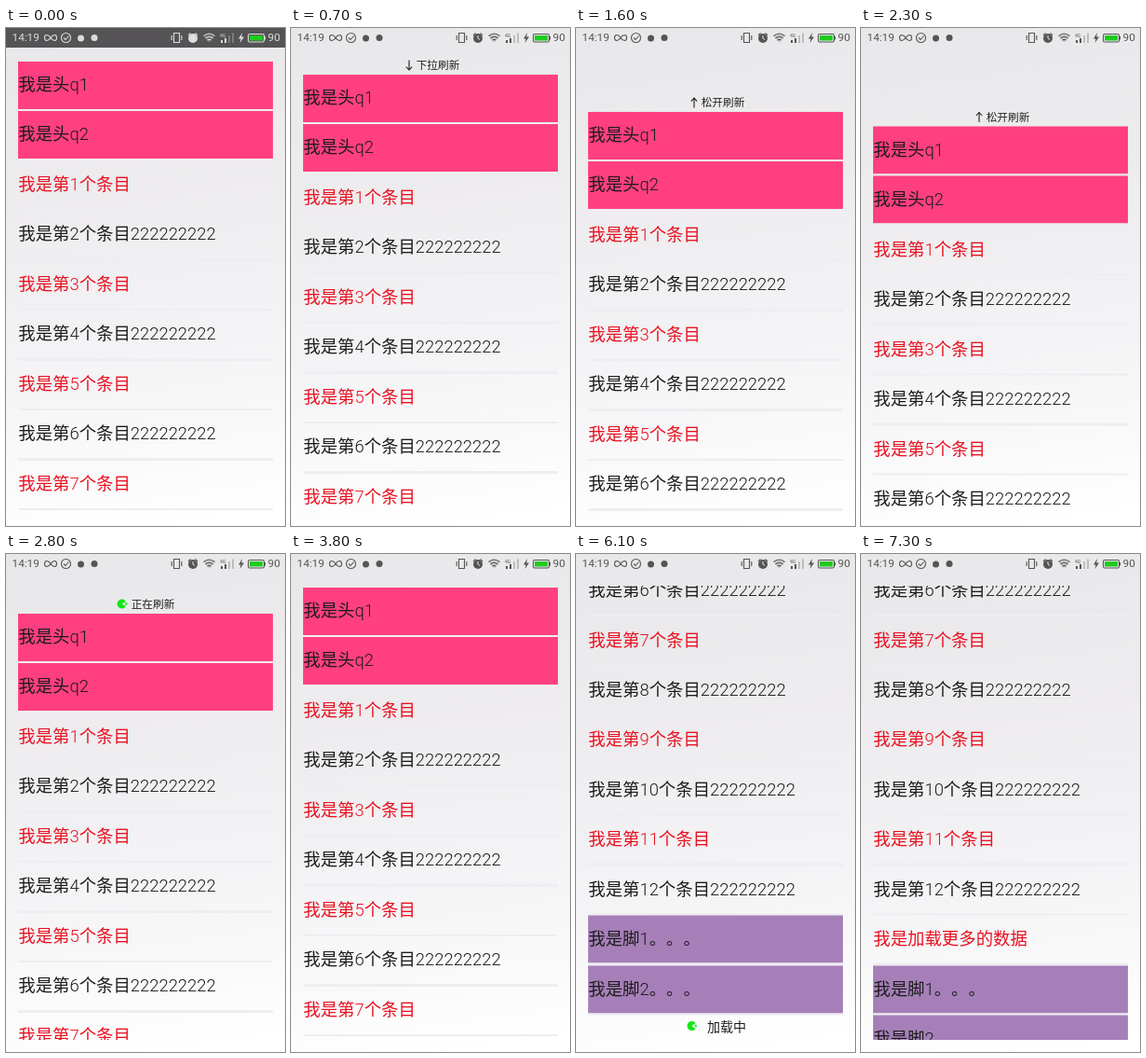
These frames come from a looping animation (300 by 534 pixels, 8000 ms). An HTML page:

```html
<!DOCTYPE html>
<html lang="zh">
<head>
<meta charset="utf-8">
<title>Pull to refresh list</title>
<style>
html, body { margin: 0; width: 100%; height: 100%; overflow: hidden; }
body {
  position: relative;
  background: linear-gradient(172deg, #e8e7e9, #eeecee 35%, #f4f3f5 65%, #fff 97%);
  font: 300 18.4px Roboto, "Noto Sans CJK SC", "Noto Sans CJK", sans-serif;
  text-spacing-trim: space-all;
  color: #1c1c1c;
  white-space: nowrap;
}
#shade { position: absolute; inset: 0 0 auto; height: 20.5px; background: #555355; }
#bar { position: absolute; left: 0; top: 0; }
#bar text { font-size: 11.8px; font-weight: 400; fill: currentColor; }
#view { position: absolute; left: 13px; top: 34px; width: 274px; height: 487px; overflow: hidden; }
#list { position: absolute; left: 0; top: 2px; width: 100%; }
.row { position: relative; height: 51px; line-height: 50px; margin-bottom: 2.44px; padding-left: .3px; }
.row::after { content: ""; position: absolute; left: 0; right: 0; top: 51px; height: 2.44px; background: #eeedf1; }
.head { background: #ff3f80; }
.foot { background: #a67fb8; }
.red { color: #e9101f; }
#top { position: absolute; left: 0; top: -17px; height: 14px; line-height: 14px; font-size: 11.67px; color: #222; }
#top span { position: absolute; left: 121.7px; }
#arrow { position: absolute; left: 109.5px; top: 1px; }
#more { position: relative; height: 26px; line-height: 24px; font-size: 14px; }
#more span { position: absolute; left: 128px; }
.pac { position: absolute; left: 103px; overflow: visible; fill: #14e514; }
#top .pac { top: -2px; }
#more .pac { top: 3px; }
</style>
</head>
<body>
<div id="shade"></div>
<svg id="bar" width="300" height="21" fill="none" stroke="currentColor" stroke-width="1.1">
  <g stroke="none">
    <text x="6.5" y="14.4">14:19</text>
    <text x="281.5" y="14.4">90</text>
    <text x="230" y="9.5" style="font-size:5px">4G</text>
  </g>
  <path d="M48 10.5C45 6 41.5 7 41.5 10.5S45 15 48 10.5S54.500 7 54.500 10.5S51 15 48 10.5Z"/>
  <circle cx="64.500" cy="10.500" r="5"/>
  <path d="M62 10.500l2 2l3.500-4"/>
  <g fill="currentColor" stroke="none">
    <circle cx="80.500" cy="11" r="3.500"/>
    <circle cx="95" cy="10.500" r="3.500"/>
    <circle cx="201" cy="11" r="5"/>
    <path d="M212.500 8.500Q218.500 3.500 224.500 8.500L218.500 16Z" opacity=".2"/>
    <path d="M231 16v-3h2v3zM235 16v-5h2v5z"/>
    <path d="M239 16v-8h2v8zM243 16v-10.500h2v10.500z" opacity=".3"/>
    <path d="M254 5l-4 6.500h2.500l-1 4.500l4.500-6.500h-2.800z"/>
  </g>
  <path d="M180.500 5.500h6v10h-6zM178.200 8v5M188.800 8v5"/>
  <path d="M196 8l2.500-2.500M206 8l-2.500-2.500"/>
  <path d="M201 8v3l2 1.500" stroke="#e9e8ea" stroke-width="1"/>
  <path d="M212.500 8.500Q218.500 3.500 224.500 8.500M214.500 11Q218.500 7.500 222.500 11M216.500 13.200Q218.500 11.500 220.500 13.200"/>
  <rect x="260.500" y="6.500" width="17" height="8.500" rx="1.500"/>
  <path d="M262 10.750h14" stroke="#1fcb1f" stroke-width="5.500"/>
  <path d="M278.500 9v3.500"/>
</svg>
<div id="view">
  <div id="list">
    <div id="top">
      <svg id="arrow" width="8" height="12" fill="none" stroke="#222" stroke-width="1.1"><path d="M4 11.500V1M.8 4.500L4 1L7.200 4.500"/></svg>
      <svg class="pac" width="17" height="17"><path/><circle cy="8.500" r="1.400"/></svg>
      <span></span>
    </div>
    <div id="more">
      <svg class="pac" width="17" height="17"><path/><circle cy="8.500" r="1.400"/></svg>
      <span>加载中</span>
    </div>
  </div>
</div>
<script>
const LOOP = 8000, STEP = 100;
const $ = s => document.querySelector(s);
const list = $('#list'), arrow = $('#arrow'), hint = $('#top span'), topPac = $('#top .pac');
const pacs = document.querySelectorAll('.pac');

function addRow(text, type = '') {
  const row = document.createElement('div');
  row.className = 'row ' + type;
  row.textContent = text;
  list.insertBefore(row, $('#more'));
  return row;
}

for (const n of [1, 2]) addRow('我是头q' + n, 'head');
for (let n = 1; n <= 12; n++) {
  if (n % 2) addRow(`我是第${n}个条目`, 'red');
  else addRow(`我是第${n}个条目222222222`);
}
const extra = addRow('我是加载更多的数据', 'red');
for (const n of [1, 2]) addRow(`我是脚${n}。。。`, 'foot');

// Keys are [time, value, ease-out power of the way there].
const PULL = [[0, 0], [600, 0], [1100, 39, 2], [1500, 42], [1900, 69.5, 2], [2300, 69.5],
  [2700, 28, 2], [3100, 28], [3400, 0, 2]];
const SCROLL = [[0, 0], [4600, 0], [5000, 281], [5400, 396.5, 2]];

function track(keys, t) {
  const i = keys.findIndex(k => k[0] > t);
  if (i < 0) return keys[keys.length - 1][1];
  const [t0, a] = keys[i - 1], [t1, b, power = 1] = keys[i];
  return a + (b - a) * (1 - (1 - (t - t0) / (t1 - t0)) ** power);
}

const clamp = v => Math.min(1, Math.max(0, v));

function drawPac(svg, t) {
  const phase = ((t - 6100) / 650 + 20.4) % 1;
  const mouth = Math.PI / 4 * (1 - Math.abs(2 * phase - 1));
  const x = 8.5 + 5 * Math.cos(mouth), dy = 5 * Math.sin(mouth);
  svg.children[0].setAttribute('d', `M8.5 8.5L${x} ${8.5 + dy}A5 5 0 1 1 ${x} ${8.5 - dy}Z`);
  svg.children[1].setAttribute('cx', 15.5 - 7 * phase);
  svg.children[1].setAttribute('opacity', 1 - phase / 2);
}

function render(t) {
  const dark = clamp(1 - t / 300);
  const ink = 85 + 135 * dark;
  $('#shade').style.opacity = dark;
  $('#bar').style.color = `rgb(${ink},${ink},${ink})`;

  const y = track(PULL, t) - track(SCROLL, t);
  list.style.transform = `translateY(${y}px)`;

  const loading = t > 2300;
  hint.textContent = loading ? '正在刷新' : t < 900 ? '下拉刷新' : '松开刷新';
  arrow.style.display = loading ? 'none' : '';
  arrow.style.transform = `rotate(${-180 * (1 - clamp((t - 900) / 240))}deg)`;
  topPac.style.display = loading ? '' : 'none';
  extra.style.display = t >= 7250 ? '' : 'none';
  pacs.forEach(p => drawPac(p, t));
}

const start = performance.now();
function tick() {
  const t = (performance.now() - start) % LOOP;
  render(Math.floor(t / STEP) * STEP);
  requestAnimationFrame(tick);
}
tick();
</script>
</body>
</html>
```
